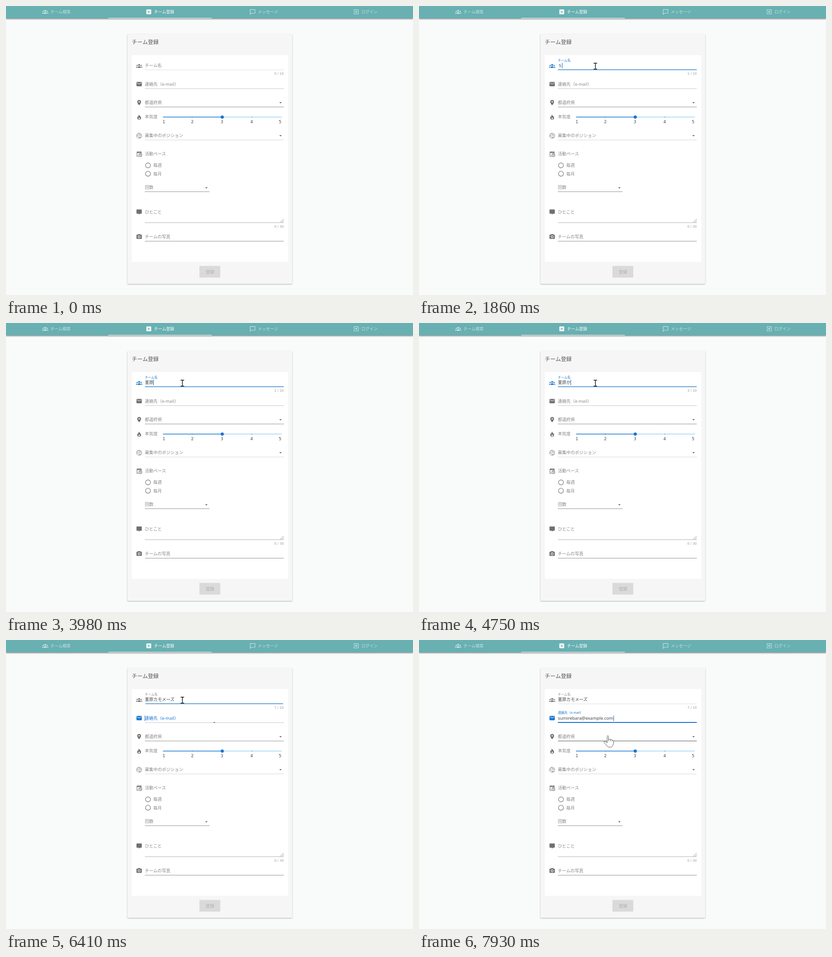
An HTML page that plays this animation: 888 px wide and 631 px high, repeating every 7990 ms.

```html
<!DOCTYPE html>
<html lang="ja">
<head>
<meta charset="utf-8">
<title>チーム登録</title>
<style>
html, body { margin: 0; width: 100%; height: 100%; overflow: hidden; background: #f9fbfa; }
svg { display: block; width: 888px; height: 631px; }
text { font: 300 9.3px 'Noto Sans', 'Noto Sans CJK JP', 'Noto Sans CJK', sans-serif; fill: #000; white-space: pre; }
.title { font-size: 11.8px; fill: #555; }
.label { fill: #868686; }
.typed { fill: #444; }
.count { font: 7.1px 'DejaVu Sans', sans-serif; fill: #999; text-anchor: end; }
.scale text { font: 8.8px 'DejaVu Sans', sans-serif; fill: #444; text-anchor: middle; }
.tab { color: rgba(255, 255, 255, .62); }
.tab.on { color: #fff; }
.tab text { fill: currentColor; font-size: 8.85px; font-weight: 400; }
.icon { color: #707070; }
.popup text { font-weight: 400; font-feature-settings: "palt"; }
.rows text { font-size: 11px; }
.popup .hint { fill: #888; font-size: 9.6px; }
.foot { fill: #444; }
</style>
</head>
<body>
<svg viewBox="0 0 888 631">
  <defs>
    <linearGradient id="footFill" x2="0" y2="1"><stop stop-color="#f8f8f8"/><stop offset="1" stop-color="#e2e2e2"/></linearGradient>
    <filter id="barDrop" x="-2%" y="-10%" width="104%" height="150%"><feDropShadow dx="0" dy="1.4" stdDeviation="1.4" flood-opacity=".5"/></filter>
    <filter id="drop" x="-10%" y="-10%" width="120%" height="130%"><feDropShadow dx="0" dy="1" stdDeviation="1" flood-opacity=".38"/></filter>
    <filter id="popDrop" x="-10%" y="-10%" width="120%" height="130%"><feDropShadow dx="1" dy="1" stdDeviation=".6" flood-opacity=".4"/></filter>
    <symbol id="group" viewBox="0 0 24 24" fill="currentColor">
      <circle cx="12" cy="8" r="3.4"/><circle cx="4.8" cy="10" r="2.5"/><circle cx="19.2" cy="10" r="2.5"/>
      <path d="M5.7 19v-2c0-2 2.9-3.7 6.3-3.7s6.3 1.7 6.3 3.7v2zM0 19v-1.8c0-1.6 1.9-2.9 4.8-3.1-.7.8-1 1.8-1 2.9v2zM24 19v-1.8c0-1.6-1.9-2.9-4.8-3.1.7.8 1 1.8 1 2.9v2z"/>
    </symbol>
    <symbol id="mail" viewBox="0 0 24 24" fill="currentColor"><path d="M20 8l-8 5-8-5V6l8 5 8-5zM20 4H4a2 2 0 0 0-2 2v12a2 2 0 0 0 2 2h16a2 2 0 0 0 2-2V6a2 2 0 0 0-2-2z"/></symbol>
    <symbol id="pin" viewBox="0 0 24 24" fill="currentColor"><path d="M12 11.5a2.5 2.5 0 1 1 0-5 2.5 2.5 0 0 1 0 5M12 2a7 7 0 0 0-7 7c0 5.25 7 13 7 13s7-7.75 7-13a7 7 0 0 0-7-7z"/></symbol>
    <symbol id="fire" viewBox="0 0 24 24" fill="currentColor"><path fill-rule="evenodd" d="M11.5 2c.3 5 7.5 6.500 7.500 13a7 7 0 0 1-14 0c0-3 1.200-5 3-7 0 2 .6 3 1.500 3.500C9 8 10 4.500 11.500 2zM12.500 12.500c0 2-3 2.500-3 5a2.500 2.500 0 0 0 5.200 0c0-2-1.700-3-2.200-5z"/></symbol>
    <symbol id="ball" viewBox="0 0 24 24" fill="none" stroke="currentColor" stroke-width="1.2"><circle cx="12" cy="12" r="9.8"/><path stroke-width=".9" d="M12 12q1-6 8-6M12 12q5 3 2 9.500M12 12q-6 2-9-3M8 3q7 0 12 9M5 6q7-2 14 8M21 15q-4 6-12 3M18 19q-8 1-10-7M4 17q-1-5 3-10"/></symbol>
    <symbol id="calendar" viewBox="0 0 24 24" fill="none" stroke="currentColor" stroke-width="2"><path d="M10 21H4V5h16v5M4 7h16M8 2v4M16 2v4"/><circle cx="16.500" cy="16.500" r="5.500"/><path d="M16.500 13v4l2.500 1.500"/></symbol>
    <symbol id="bubble" viewBox="0 0 24 24" fill="currentColor"><path d="M4 2h16a2 2 0 0 1 2 2v12a2 2 0 0 1-2 2h-5l-4 4v-4H4a2 2 0 0 1-2-2V4a2 2 0 0 1 2-2z"/></symbol>
    <symbol id="camera" viewBox="0 0 24 24" fill="currentColor"><circle cx="12" cy="12" r="3.2"/><path fill-rule="evenodd" d="M9 2L7.200 4H4a2 2 0 0 0-2 2v12a2 2 0 0 0 2 2h16a2 2 0 0 0 2-2V6a2 2 0 0 0-2-2h-3.200L15 2zM12 17a5 5 0 1 1 0-10 5 5 0 0 1 0 10z"/></symbol>
    <symbol id="plus" viewBox="0 0 24 24" fill="currentColor"><path fill-rule="evenodd" d="M5 3h14a2 2 0 0 1 2 2v14a2 2 0 0 1-2 2H5a2 2 0 0 1-2-2V5a2 2 0 0 1 2-2zM11 7v4H7v2h4v4h2v-4h4v-2h-4V7z"/></symbol>
    <symbol id="message" viewBox="0 0 24 24" fill="none" stroke="currentColor" stroke-width="2"><path d="M3 3h18v14H7l-4 4z"/></symbol>
    <symbol id="login" viewBox="0 0 24 24" fill="none" stroke="currentColor" stroke-width="2"><path d="M4 9V4h16v16H4v-5M3 12h12M11 8l4 4-4 4"/></symbol>
  </defs>

  <rect width="888" height="27" fill="#68b0b2" filter="url(#barDrop)"/>
  <rect x="223" y="26" width="226" height="1" fill="#fff"/>
  <g id="tabs"></g>

  <rect x="265" y="61" width="359.5" height="545.5" rx="1.5" fill="#f6f6f6" filter="url(#drop)"/>
  <text class="title" x="274.5" y="82.7">チーム登録</text>
  <rect x="274.5" y="107" width="341" height="451.5" fill="#fff"/>
  <g id="form"></g>

  <g stroke-width="1.4">
    <path d="M472 242.5H602" stroke="#a0d3f2"/>
    <path d="M342.5 242.5H472" stroke="#1976d2"/>
    <path d="M406 242.5h1M536 242.5h1" stroke="#1a4f80"/>
    <circle cx="471.800" cy="242.5" r="3.500" fill="#1976d2"/>
  </g>
  <g class="scale"><text x="344.5" y="256">1</text><text x="406.5" y="256">2</text><text x="471" y="256">3</text><text x="536" y="256">4</text><text x="598" y="256">5</text></g>
  <g fill="none" stroke="#6c6c6c" stroke-width="1.1"><circle cx="309.8" cy="348" r="5.4"/><circle cx="309.8" cy="366.2" r="5.4"/></g>
  <path d="M598.5 472.5l7.5-7.5M602.5 472.5l3.5-3.5" stroke="#777" stroke-width=".8"/>
  <text class="count" x="606" y="483.5">0 / 30</text>
  <rect x="422" y="567.5" width="45.5" height="25.5" rx="1.2" fill="#dadada"/>
  <text x="435.7" y="583.5" style="fill:#b0b0b0">登録</text>

  <text id="count" class="count" x="606" y="150.2"></text>
  <g id="live"></g>
  <path id="prefHover" d="M303 220.5H606" stroke="#555"/>

  <g id="suggest" class="popup">
    <rect x=".5" y="137.5" width="88" height="68" fill="#fff" stroke="#8c8c8c" filter="url(#popDrop)"/>
    <rect x="1" y="187" width="87" height="18" fill="url(#footFill)"/>
    <g class="rows"><text x="4.500" y="150.7"></text><text x="4.500" y="167.2"></text><text x="4.500" y="183.7"></text></g>
    <text class="foot" x="15" y="200.3" style="font-size:10px">Tabキーで選択</text>
  </g>
  <g id="convert" class="popup">
    <rect x="303.5" y="137.5" width="170.5" height="68" fill="#fff" stroke="#8c8c8c" filter="url(#popDrop)"/>
    <rect x="304" y="138" width="14" height="49" fill="#eff0fb"/>
    <rect x="304" y="138" width="169.5" height="16.5" fill="#cce8ff"/>
    <rect x="304" y="187" width="169.5" height="18" fill="#f3f3f3"/>
    <g class="rows" id="choices"></g>
    <text class="foot" x="306.5" y="199.8" style="font-size:10.6px">Kanoru</text>
    <text class="foot" x="470.5" y="200.3" text-anchor="end" style="font-size:9.8px">Ctrl+Delで履歴から削除 1/3</text>
  </g>

  <path id="beamFoot" d="M380.5 138.7h9" stroke="#1976d2" stroke-width="1.2"/>
  <g id="cursor">
    <circle id="glow" r="10.3" fill="#fff44d" opacity=".85"/>
    <path id="beam" d="M-3.800-6.500h3l.8.800.8-.800h3M0-6V6M-3.800 6.500h3l.8-.800.8.800h3" fill="none" stroke="#111" stroke-width="1.4"/>
    <path id="arrow" d="M0 0v14l3.200-3 2.200 5 2-.9-2.200-4.900h4.600z" fill="#fff" stroke="#222" stroke-width=".9"/>
    <path id="hand" d="M-1.500 1.500c0-2 3-2 3 0V8l2-.5 2 1 2.200-.3 1.700 1.200 2 .2 1.200 1.500v5.500l-2 5c-1 2.600-2.500 3.400-5 3.400H3c-2 0-3.500-1-5-3l-6.500-7.500c-1-1.700 1.200-3 3-1.700l4 2.700zM1.500 8v4M5.500 8.500v3.500M9.300 9.400v3" fill="#fff" stroke="#555" stroke-width="1"/>
  </g>
</svg>
<script>
const LOOP = 7990, BLUE = '#1976d2', GREY = '#707070', EM = 9.3, LEFT = 303, RIGHT = 606;
const $ = id => document.getElementById(id);
const show = (id, on) => $(id).setAttribute('visibility', on ? 'visible' : 'hidden');
const icon = (name, cx, cy, id = '') =>
  `<use href="#${name}" class="icon" id="${id}" x="${cx - 7}" y="${cy - 7}" width="14" height="14"/>`;
const line = (y, color, right = RIGHT) => `<path d="M${LEFT} ${y}H${right}" stroke="${color}"/>`;
const label = (y, str, x = LEFT) => `<text class="label" x="${x}" y="${y}">${str}</text>`;
const arrow = (x, y) => `<path d="M${x - 2.8} ${y - 1.3}h5.600l-2.800 2.800z" fill="#666"/>`;

$('tabs').innerHTML = [['group', 'チーム検索', 85.5], ['plus', 'チーム登録', 311.5], ['message', 'メッセージ', 538], ['login', 'ログイン', 764]]
  .map(([name, str, x], i) => `<g class="tab ${i === 1 ? 'on' : ''}">
    <use href="#${name}" x="${x - 7}" y="5.8" width="14" height="14"/><text x="${x + 11.5}" y="15.8">${str}</text></g>`).join('');

$('form').innerHTML =
  icon('group', 290.5, 131, 'teamIcon') + line(139.5, '#dedede') +
  icon('mail', 290.5, 170.5, 'mailIcon') + line(180.5, '#c8c8c8') +
  icon('pin', 290.5, 211) + label(214.3, '都道府県') + line(220.5, '#949494') + arrow(599, 211.3) +
  icon('fire', 290.5, 242.5) + label(245.3, '本気度') +
  icon('ball', 290.5, 283.3) + label(286.3, '募集中のポジション') + line(292.5, '#d8d8d8') + arrow(599, 283.3) +
  icon('calendar', 290.5, 323) + label(325.7, '活動ペース') +
  label(351.3, '毎週', 321.3) + label(369.5, '毎月', 321.3) +
  label(399.4, '回数') + line(405.5, '#949494', 444) + arrow(437.2, 397) +
  icon('bubble', 290.5, 450) + label(452.8, 'ひとこと') + line(473, '#b0b0b0') +
  icon('camera', 290.5, 503.8) + label(507.3, 'チームの写真') + line(513.5, '#949494');

$('live').innerHTML = ['team', 'mail'].map(id => `<text id="${id}Label" class="label" x="${LEFT}"></text>
  <path id="${id}Line" stroke="${BLUE}"/><text id="${id}Text" class="typed" x="${LEFT}"></text>`).join('') +
  `<path id="caret" stroke="${BLUE}" stroke-width="1.1"/>`;
$('teamLabel').textContent = 'チーム名';
$('mailLabel').textContent = '連絡先（e-mail）';
$('mailText').style.fontSize = '9.6px';

$('choices').innerHTML = ['カモメーズ', 'カモメ', 'カーテン'].map((str, i) => {
  const y = 150.5 + i * 16.5;
  return `<text x="307.8" y="${y}" style="font-size:10px">${i + 1}</text><text x="321" y="${y}" style="font-size:10.2px">${str}</text>
    <text class="hint" x="374" y="${y}">[全] カタカナ</text>`;
}).join('');

// Each entry: start time, field text, suggestions, popup x
const start = ['すぐ', 'すみません', 'すごい'], middle = ['すみません', 'すみ', '住み'];
const flower = ['菫原の', 'すみれ', '菫原'], place = ['菫原', '菫原の', '菫原に'];
const bird = ['カモメーズ', 'から', 'かも'];
const typing = [
  [0, ''], [1860, 'ｓ'], [1930, 'す', start], [2240, 'すｍ', start], [2320, 'すみ', middle],
  [2640, 'すみｒ', flower], [2960, 'すみれ', flower], [3260, 'すみれｂ', flower], [3340, 'すみれば', flower],
  [3430, 'すみれば', place], [3570, 'すみればｒ', place], [3850, 'すみればら', place], [3920, '菫原', place],
  [3980, '菫原'], [4670, '菫原ｋ'], [4750, '菫原か'], [4840, '菫原か', bird, 316], [5310, '菫原カモメーズ']
];
const path = [
  [70, 790, 620], [300, 620, 380], [480, 445, 180], [680, 378, 116], [929, 378, 116], [930, 374.5, 128.7],
  [1010, 374.5, 128.7], [1150, 384.8, 131.2], [7090, 384.8, 131.2], [7100, 386, 131.5], [7250, 386, 132],
  [7400, 395, 160], [7550, 407, 193], [7720, 412, 209]
];
const during = (t, a, b) => t >= a && t < b;
const ramp = (t, from) => {
  const p = Math.min(1, Math.max(0, (t - from) / 300));
  return 1 - (1 - p) ** 3;
};

function pointAt(t) {
  const i = path.findIndex(k => k[0] > t);
  if (i < 1) return path[i < 0 ? path.length - 1 : 0].slice(1);
  const [a, b] = [path[i - 1], path[i]], p = (t - a[0]) / (b[0] - a[0]);
  return [a[1] + (b[1] - a[1]) * p, a[2] + (b[2] - a[2]) * p];
}

function field(id, base, lineY, width, float, focus, active) {
  const tag = $(id + 'Label'), rule = $(id + 'Line'), half = 151.5 * focus;
  tag.setAttribute('y', base - 12.5 * float);
  tag.style.fontSize = EM - 2.3 * float + 'px';
  tag.style.fill = active ? BLUE : '';
  $(id + 'Icon').style.color = active ? BLUE : GREY;
  rule.setAttribute('d', `M${454.5 - half} ${lineY}h${half * 2}`);
  rule.setAttribute('stroke-width', width);
  rule.setAttribute('visibility', focus ? 'visible' : 'hidden');
  $(id + 'Text').setAttribute('y', base + .3);
}

function render(t) {
  const [, name, list, popX = 298] = typing.findLast(s => s[0] <= t);
  const onMail = t >= 6410, mail = t >= 6950 ? 'sumirebara@example.com' : '';
  field('team', 133, 139.2, 1.3, ramp(t, 1010), ramp(t, 1010) * (1 - ramp(t, 6410)), during(t, 1010, 6410));
  field('mail', 173.8, 180, 1.8, ramp(t, 6410), ramp(t, 6410), onMail);
  $('teamText').textContent = name;
  $('mailText').textContent = mail;
  $('count').textContent = name.length + ' / 10';

  const caretX = onMail ? (mail ? 424.5 : LEFT) : LEFT + name.length * EM;
  $('caret').setAttribute('d', `M${caretX + .2} ${onMail ? 165 : 124}v12`);
  show('caret', t >= 1080 && !during(t, 1550, 1860) && !during(t, 5940, 6410) && !during(t, 7450, 7930));

  show('suggest', list);
  if (list) {
    $('suggest').setAttribute('transform', `translate(${popX})`);
    document.querySelectorAll('#suggest .rows text').forEach((row, i) => row.textContent = list[i]);
  }
  show('convert', during(t, 5310, 5470));

  const [x, y] = pointAt(t), moving = t >= 70;
  $('cursor').setAttribute('transform', `translate(${x} ${y})`);
  show('glow', during(t, 70, 1250));
  show('arrow', moving && t < 930);
  show('beam', during(t, 930, 7480));
  show('hand', t >= 7480);
  show('beamFoot', during(t, 6720, 7100));
  show('prefHover', t >= 7550);
}

const begin = performance.now();
function tick() {
  render((performance.now() - begin) % LOOP);
  requestAnimationFrame(tick);
}
tick();
</script>
</body>
</html>
```
